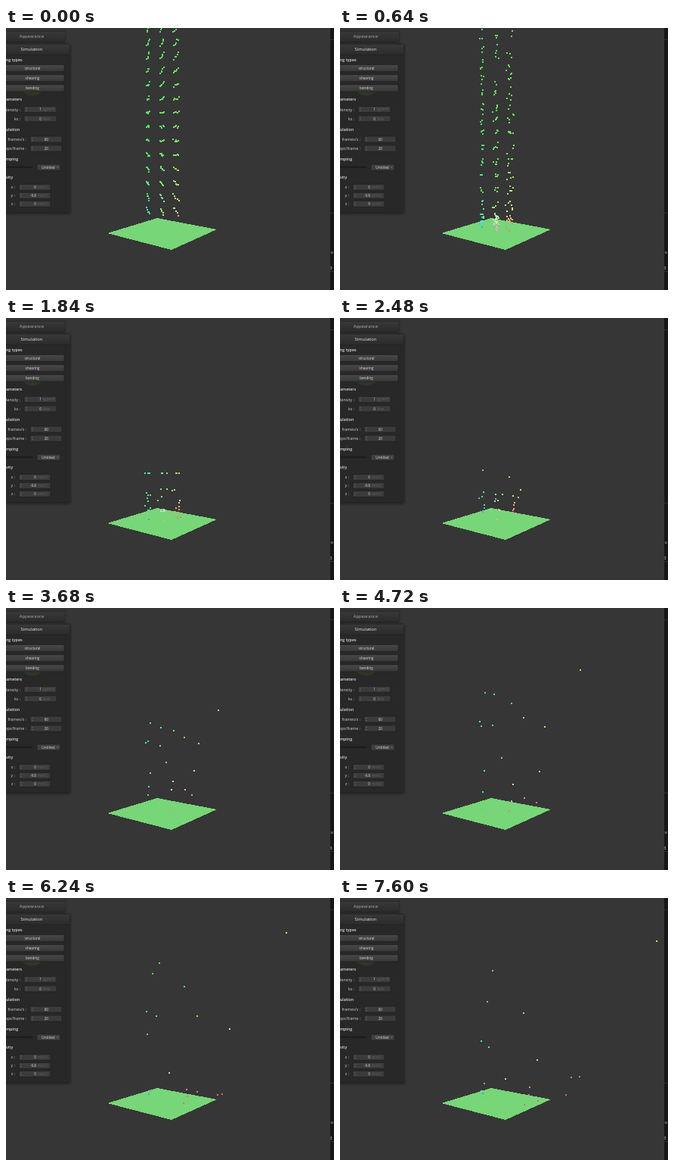
An HTML page with a canvas for the animation above (7.68 s loop, 434 px wide and 346 px high).

```html
<!DOCTYPE html>
<html lang="en">
<head>
<meta charset="utf-8">
<title>Falling particles</title>
<style>
  html, body { margin: 0; width: 100%; height: 100%; overflow: hidden; background: #363636; }
  svg, canvas { position: absolute; left: 0; top: 0; width: 434px; height: 346px; }
  text { font-family: "Open Sans", "DejaVu Sans", sans-serif; font-size: 5.3px; fill: #d4d4d4; }
  .title { font-size: 5.8px; fill: #ececec; }
  .dim { fill: #adadad; }
  .head { fill: #dedede; font-weight: 600; }
  .mid { text-anchor: middle; }
  .end { text-anchor: end; }
  .small { font-size: 4.7px; fill: #dedede; }
  .unit { font-size: 4.4px; fill: #686868; }
</style>
</head>
<body>
<svg viewBox="0 0 434 346">
  <defs>
    <linearGradient id="btn" x2="0" y2="1">
      <stop offset="0" stop-color="#484848"/><stop offset="1" stop-color="#383838"/>
    </linearGradient>
    <linearGradient id="bar" x2="0" y2="1">
      <stop offset="0" stop-color="#383838"/><stop offset="1" stop-color="#2b2b2b"/>
    </linearGradient>
    <filter id="soft" x="-20%" y="-20%" width="140%" height="140%"><feGaussianBlur stdDeviation="1.6"/></filter>
  </defs>
  <rect width="434" height="346" fill="#363636"/>
  <rect x="-9" y="4" width="88" height="16" fill="#202020" filter="url(#soft)"/>
  <rect x="-9" y="22" width="94" height="223" fill="#1d1d1d" filter="url(#soft)"/>
  <rect x="-9" y="5" width="87" height="13" fill="url(#bar)"/>
  <rect x="-9" y="22" width="93" height="221" fill="#282828"/>
  <rect x="-9" y="22" width="93" height="13" fill="url(#bar)"/>
  <path d="M0 35.5H84" stroke="#222"/>
  <path d="M22 84Q35 95 48 84Z" fill="#2e3626"/>
  <g id="panel"></g>
  <path d="M134 271L200 251L279 266L219 293Z" fill="#77d677" shape-rendering="crispEdges"/>
  <rect x="429" width="5" height="346" fill="#171717"/>
  <path d="M429 15.5H434M429 244.5H434M429 321.5H434" stroke="#303030"/>
  <text x="429.5" y="298">u</text>
  <text x="428.5" y="319">3</text>
</svg>
<canvas id="stage" width="434" height="346"></canvas>
<script>
const panel = document.getElementById('panel');
const ctx = document.getElementById('stage').getContext('2d');
const LOOP = 7680, STEP = 80, FLOOR = 265, HIT = 2.07;

function add(tag, attrs, label) {
  const el = document.createElementNS('http://www.w3.org/2000/svg', tag);
  for (const key in attrs) el.setAttribute(key, attrs[key]);
  if (label) el.textContent = label;
  panel.append(el);
}
const write = (label, x, y, cls) => add('text', { x, y, class: cls }, label);
const box = (x, y, width, height, fill) =>
  add('rect', { x, y, width, height, fill, rx: 1, stroke: '#1c1c1c', 'stroke-width': .6 });

function field(label, labelEnd, y, x, w, value, unit) {
  write(label, labelEnd, y + 2, 'end');
  box(x, y - 4, w, 8, '#3b3b3b');
  add('path', { d: `M${x + 2} ${y - 1}l1 -1.5l1 1.5M${x + 2} ${y + 1}l1 1.5l1 -1.5`, fill: '#686868' });
  write(value, unit ? x + 23 : x + 24, y + 1.8, 'small end');
  if (unit) write(unit, x + 25, y + 1.8, 'unit');
}

write('Appearance', 34, 13, 'title dim mid');
write('Simulation', 34, 30, 'title mid');
[['ng types', 44], ['ameters', 96], ['ulation', 136], ['mping', 175], ['vity', 199]]
  .forEach(([label, y]) => write(label, 0, y, 'head'));
['structural', 'shearing', 'bending'].forEach((label, i) => {
  box(-9, 48.5 + i * 13.2, 86, 9, 'url(#btn)');
  write(label, 35, 54.8 + i * 13.2, 'small mid');
});
field('density :', 19, 107.5, 24, 43, '1', 'kg/m^3');
field('ks :', 19, 119.8, 24, 43, '0', 'N/m');
field('frames/s :', 27, 147, 32, 42, '60');
field('steps/frame :', 27, 159, 32, 42, '20');
box(-9, 183, 44, 1.5, '#1c1c1c');
box(41, 180, 31, 8, '#3f3f3f');
write('Untitled', 56, 185.6, 'small mid');
add('path', { d: 'M67 183l1.2 1.5l1.2 -1.5', fill: 'none', stroke: '#888', 'stroke-width': .6 });
['x :', 'y :', 'z :'].forEach((label, i) =>
  field(label, 12, 210.3 + i * 11, 17, 42, i === 1 ? '-9.8' : '0', 'm/s^2'));

let seed = 41;
const rnd = () => (seed = seed * 16807 % 2147483647) / 2147483647;
const range = (a, b) => a + (b - a) * rnd();

// Stacked grid, three columns wide, partly above the stage.
const crowd = [];
for (let row = 0; row < 19; row++) for (let col = 0; col < 3; col++) for (let j = 0; j < 5; j++) {
  const shown = row < 14, u = j - 2;
  const base = 242 - 18.6 * row, tilt = (base - 130) / 115;
  const p = {
    x: 188 + 18.5 * col + u * (.8 + .4 * col) + range(-.6, .6),
    y: base + u * 2.4 * tilt + range(-1.5, 1.5),
    drift: range(-1, 1) * (1.2 + 1.5 * col),
    pace: range(.95, 1.04),
    floor: range(255, 269),
    kick: rnd() * (shown ? 60 : 110),
    z: rnd() * 25
  };
  p.hit = (Math.sqrt(106 ** 2 + 160 * Math.max(0, p.floor - p.y)) - 106) / 80 / p.pace;
  p.end = shown ? .5 + rnd() : p.hit + rnd() ** 2;
  if (rnd() < (shown ? 1 : .65)) crowd.push(p);
}

// High rebounds: x at impact, sideways px/s, time and height of the apex.
const flyers = [
  [225, 35, 6.55, 45], [206, -.7, 6.5, 85], [190, .9, 5.8, 98],
  [213, 5.4, 5.75, 114], [226, 6.4, 5.2, 142], [229, 16, 5.05, 156],
  [207, -1.8, 5.45, 150], [184, .5, 5.5, 144], [188, -.2, 4.9, 156]
].map(([x, vx, apex, top]) => ({ x, vx, apex, top, z: rnd() * 60 }));

// Low rebounds: each hop is shorter than the one before.
const hoppers = Array.from({ length: 11 }, (_, i) => ({
  x: 188 + 18.5 * (i % 3) + range(-2, 3),
  vx: (i % 3) * range(-2, 9),
  hop: 1.8 + i * .3,
  floor: range(260, 274),
  z: rnd() * 60
}));

// Colour follows position: red to the right, green upwards, blue towards the viewer.
function dot(x, y, z, size) {
  const part = [Math.max(0, x - 190), Math.max(0, 262 - y) + 12, z];
  const most = Math.max(...part);
  ctx.fillStyle = `rgb(${part.map(v => Math.round(80 + 150 * v / most)).join()})`;
  ctx.fillRect(Math.round(x) - 1, Math.round(y) - 1, size, size);
}

function drawCrowd(t) {
  for (const p of crowd) {
    if (t > p.end) continue;
    const s = t - p.hit, u = t * p.pace;
    const y = s < 0 ? p.y + 106 * u + 40 * u * u : Math.min(p.floor, p.floor - p.kick * s + 12 * s * s);
    dot(p.x + p.drift * t, y, p.z, 2);
  }
}

function drawFlyers(t) {
  const s = t - HIT;
  for (const p of flyers) {
    const k = (t - p.apex) / (p.apex - HIT);
    if (s < 0) dot(p.x, FLOOR + 270 * s + 40 * s * s, p.z, 2);
    else dot(p.x + p.vx * s, p.top + (FLOOR - p.top) * k * k, p.z, 2);
  }
}

function drawHoppers(t) {
  if (t < HIT) return;
  for (const p of hoppers) {
    let u = t - HIT, hop = p.hop;
    while (u > hop) { u -= hop; hop *= .7; }
    dot(p.x + p.vx * (t - HIT), p.floor - 11 * u * (hop - u), p.z, 2);
  }
}

const start = performance.now();
function frame() {
  const ms = (performance.now() - start) % LOOP;
  const t = Math.floor(ms / STEP) * STEP / 1000;
  ctx.clearRect(0, 0, 434, 346);
  drawCrowd(t);
  drawFlyers(t);
  drawHoppers(t);
  requestAnimationFrame(frame);
}
frame();
</script>
</body>
</html>
```
